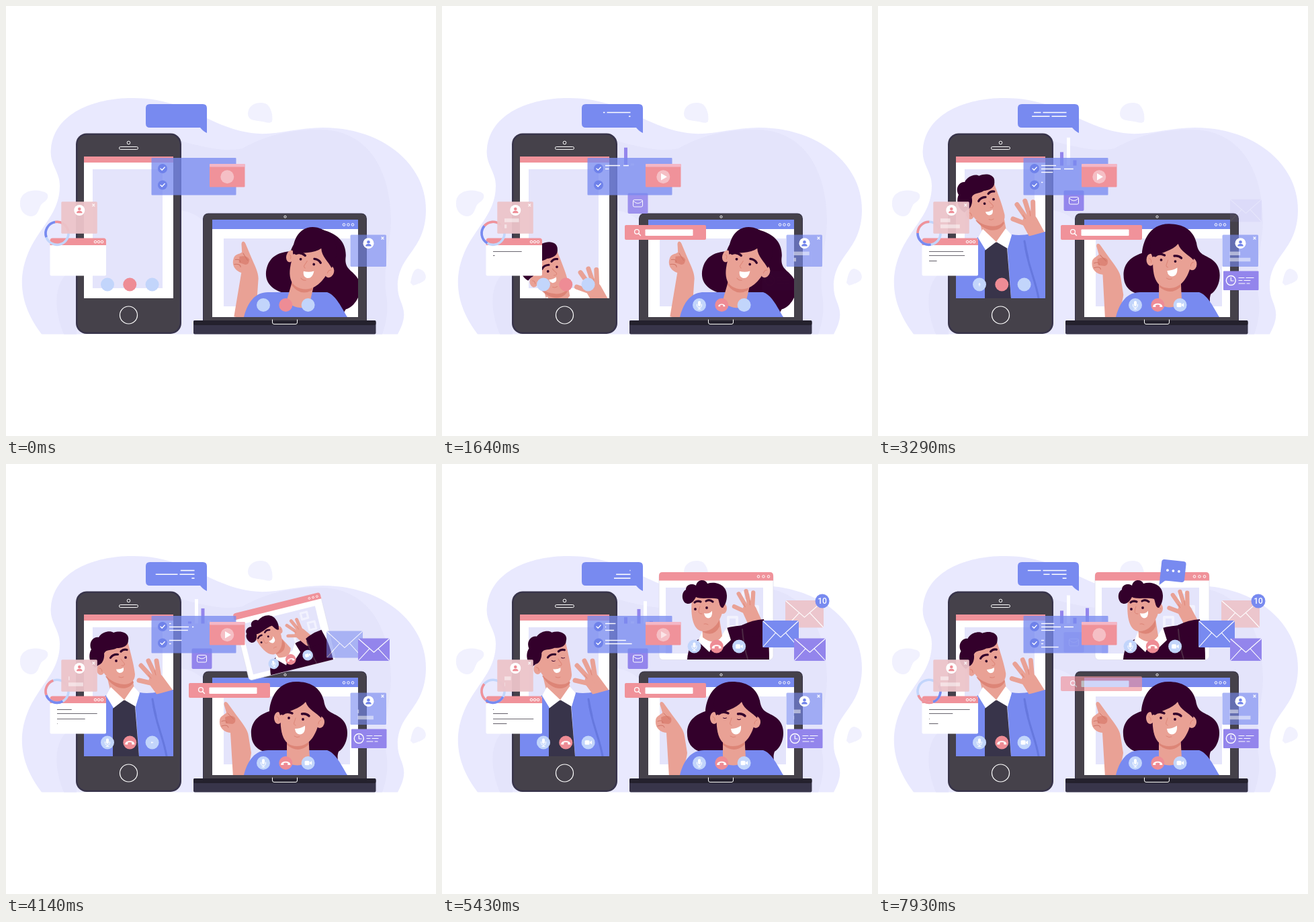
Animation of 640x640 px, one loop 8 s. Source, as an HTML page:

```html
<!DOCTYPE html>
<html lang="en">
<head>
<meta charset="utf-8">
<title>Video call</title>
<style>
html, body { margin: 0; width: 100%; height: 100%; overflow: hidden; background: #fff; }
svg { display: block; width: 100vw; height: 100vh; }
</style>
</head>
<body>
<svg id="stage" viewBox="0 0 640 640"></svg>
<script>
const BLUE = '#788af0', PINK = '#f0929a', SKY = '#c2d5fb', PURPLE = '#9385ec', PALE = '#e4e4fb',
  HAIR = '#33002b', SKIN = '#e9a195', SHADE = '#dd8577', BODY = '#45414a', LOOP = 8000;

// ---------- markup helpers ----------
const rect = (x, y, w, h, fill, r = 0, more = '') =>
  `<rect x="${x}" y="${y}" width="${w}" height="${h}" rx="${r}" fill="${fill}" ${more}/>`;
const disc = (x, y, r, fill, more = '') => `<circle cx="${x}" cy="${y}" r="${r}" fill="${fill}" ${more}/>`;
const ring = (x, y, r, w = 1) => disc(x, y, r, 'none', `stroke="#fff" stroke-width="${w}"`);
const oval = (x, y, rx, ry, fill) => `<ellipse cx="${x}" cy="${y}" rx="${rx}" ry="${ry}" fill="${fill}"/>`;
const shape = (d, fill) => `<path d="${d}" fill="${fill}"/>`;
const line = (d, color = '#fff', w = 1) =>
  `<path d="${d}" fill="none" stroke="${color}" stroke-width="${w}" stroke-linecap="round" stroke-linejoin="round"/>`;
const group = (id, body) => `<g id="${id}">${body}</g>`;
const dots = (x, y, step) => [0, 1, 2].map(i => ring(x + i * step, y, 1.8)).join('');

const icons = [
  rect(-2, -6, 4, 8, '#fff', 2) + line('M-3.5 -1V1Q-3.5 4 0 4T3.5 1V-1M0 4V6M-2 6H2'),
  shape('M-7 3C-8 -4 8 -4 7 3L3 3V0Q0 -1 -3 0V3Z', '#fff'),
  rect(-5, -3.2, 7, 6.4, '#fff', 1.5) + shape('M2.5 -.8L5.5 -3V3L2.5 .8Z', '#fff'),
];
const buttons = (name, x, y) => icons.map((icon, i) =>
  disc(x + i * 33.3, y, 10, i === 1 ? '#ee8c95' : SKY) +
  `<g transform="translate(${x + i * 33.3} ${y})">${group(name + i, icon)}</g>`).join('');

const hand = line('M2 2L-12 -17', SKIN, 23) +
  line('M-12 -12L-38 -18M-15 -18L-35 -40M-12 -22L-24 -47M-8 -22L-12 -47', SKIN, 7) +
  line('M-24 -26L-20 -21M-15 -33L-13 -26', SHADE);

const eyes = (name, points) => group(name, points.map(([x, y]) => disc(x, y, 1.9, HAIR)).join('')) +
  group(name + 'Shut', points.map(([x, y]) => line(`M${x - 2.5} ${y}q2.5 1.5 5 0`, HAIR)).join(''));

const card = (x, y, fill, opacity, accent) => rect(x, y, 53.5, 47.5, fill, 1.5, `opacity="${opacity}"`) +
  disc(x + 27, y + 12.7, 8, '#fff') + disc(x + 27, y + 10.7, 2.3, accent) +
  shape(`M${x + 22.7} ${y + 17}q0 -3.6 4.3 -3.6t4.3 3.6z`, accent) +
  line(`M${x + 46.5} ${y + 3.5}l3 3m0 -3l-3 3`, '#fff', 1.2);

const envelope = (id, x, y, w, h, fill) => group(id, rect(x, y, w, h, fill, 2) +
  line(`M${x + 1} ${y + 1}L${x + w / 2} ${y + h * .62}L${x + w - 1} ${y + 1}
    M${x + 1} ${y + h - 1}L${x + w * .36} ${y + h * .46}M${x + w - 1} ${y + h - 1}L${x + w * .64} ${y + h * .46}`, '#fff', 1.1));

// ---------- lines that grow and shrink ----------
const strokes = { doc: ['#6a6670', 1.1], note: ['#fff', 1.4], bubble: ['#fff', 1.6], bar: ['#fff', 5.5] };
const rows = [
  ...[[365.5, 61, 0], [371.5, 61, 1300], [379.5, 62, 2550], [386.5, 32, 3900]]
    .map(([y, len, delay]) => ({ kind: 'doc', x: 76, y, len, delay, period: 5200, dir: 1 })),
  ...[[158.5, 58, 0, 35], [164.3, 59, 1300, 22], [170, 29, 3500]]
    .map(([y, len, delay, cut]) => ({ kind: 'bubble', x: 280.5, y, len, delay, period: 5200, dir: -1, cut, gap: 3 })),
  ...[[237.5, 42, 0, 22], [242.5, 48, 1150, 29], [247.5, 28, 2000], [262.5, 32, 2900], [267.5, 48, 3800], [272.5, 28, 6100]]
    .map(([y, len, delay, cut]) => ({ kind: 'note', x: 243, y, len, delay, period: 4500, dir: 1, cut, gap: 5 })),
  ...[[93, 319, 26, 0], [93, 328, 29, 1150], [523.5, 368.3, 28, 0], [523.5, 377.5, 31, 1150]]
    .map(([x, y, len, delay]) => ({ kind: 'bar', x, y, len, delay, period: 4500, dir: 1 })),
];
const rowMarkup = kind => rows.map((r, i) => r.kind !== kind ? '' :
  `<path id="row${i}" stroke="${strokes[kind][0]}" stroke-width="${strokes[kind][1]}" ${kind === 'bar' ? 'opacity=".5"' : ''}/>`).join('');

// Chart columns: x, full height, delay, colour
const columns = [[271, 33, 0, PURPLE], [281, 43, 1250, '#fff'], [290.5, 27, 2450, PURPLE], [300, 37, 3600, '#fff'], [309, 30, 4900, PURPLE]];

// ---------- scene ----------
const backdrop =
  shape('M53 488.5C20 445 18 405 32 370C48 330 80 310 80 268C80 245 64 235 67 212C72 160 130 137 188 137C270 137 300 180 365 189C400 194 430 181 472 181C560 181 626 235 625 305C624 365 583 370 583 418C583 445 604 450 583 488.5Z', '#e9e9fe') +
  shape('M250 198C310 215 330 216 352 212C390 190 430 183 475 184C545 190 572 250 573 320C573 350 560 390 566 430C570 455 565 475 560 488.5H330C330 340 300 306 250 303Z', PALE) +
  shape('M86 488.5C66 440 75 400 105 390V488.5Z', PALE) +
  shape('M21 292C22 276 40 272 54 276C66 278 64 288 55 293C48 298 50 312 38 313C27 313 20 303 21 292Z', '#f1f1fe') +
  shape('M360 160C361 146 376 141 388 146C394 150 398 163 396 172C392 176 385 172 375 171C366 170 360 168 360 160Z', '#f1f1fe') +
  shape('M602 412C604 400 607 390 614 391C622 393 627 400 624 407C620 412 612 414 606 416Z', '#f1f1fe');

const bubble = shape('M214 146H293Q299 146 299 152V189Q294 187 289 181H214Q208 181 208 175V152Q208 146 214 146Z', BLUE) + rowMarkup('bubble');

const caller = group('caller',
  shape('M116 435V372C125 358 140 352 149 344L160 362L165 400L159 435Z', BLUE) +
  shape('M192 352L199 340C215 343 230 338 249 336V435H198Z', BLUE) +
  shape('M159 364L176 350L192 360L198 435H159Z', '#38344a') +
  line('M218 350C222 385 234 405 239 435', '#6678de', 3) +
  `<g transform="translate(236 340)">${group('callerHand', hand)}</g>` +
  shape('M214 345Q232 341 249 336V372L222 372Z', BLUE) +
  line('M218 350Q220 362 223 374', '#6678de', 3) +
  shape('M150 315L188 318L192 340L176 352L156 340Z', SKIN) +
  shape('M149 345L156 332L176 351L160 363Z', '#fff') + shape('M190 331L199 341L193 361L176 351Z', '#fff') +
  group('callerHead',
    shape('M148 316C162 338 182 338 190 325L187 318Z', SHADE) +
    shape('M138 280C140 300 143 318 165 326C180 331 192 326 192 313C190 296 185 280 181 264L150 266Z', SKIN) +
    oval(141, 306, 6, 8, SKIN) + line('M139 304q4 0 4 5', SHADE) +
    shape('M133 303C122 295 123 282 127 276C122 266 130 256 138 258C142 250 155 247 160 251C172 247 184 252 182 262C182 272 172 274 165 274C158 278 149 275 146 282C147 290 143 298 138 299Z', HAIR) +
    line('M155.5 288.5Q159 283 166.5 283.5M171 279Q175 275 180 276.5', HAIR, 3.2) +
    eyes('callerEyes', [[164, 293], [178, 288]]) +
    line('M171 290C174 296 179 297 175 300L172 300M168 317q4 2 7 0', SHADE) +
    shape('M164 305.5Q170 306 175 303Q176 311 169 311Q165 310 164 305.5Z', '#fff')));

const phone = rect(104, 189.5, 157, 298.5, '#38344a', 16) + rect(106.5, 192, 152, 293.5, BODY, 14) +
  rect(116, 224, 133, 211, '#fff') + rect(116, 224, 133, 9, PINK) + rect(129, 243, 104, 177, PALE) +
  ring(182.5, 203.5, 2.3) + rect(168.5, 209.5, 28, 4, 'none', 2, 'stroke="#fff"') + ring(182.5, 460, 13, 1.2) +
  `<g clip-path="url(#phoneScreen)">${caller}</g>` + buttons('phoneIcon', 151, 414.5);

const host = group('hostHair',
    shape('M432 324C402 324 393 352 392 368C368 376 362 392 366 410C371 428 390 432 410 430L460 430C475 432 485 448 493 446C495 440 492 436 495 428C508 420 513 395 502 382C490 368 476 374 473 352C468 332 452 324 432 324Z', HAIR)) +
  group('hostArm',
    shape('M338 466L334 400C324 399 317 392 318 382C318 375 325 374 328 370L324.5 358C324 353 328 353 330 356L343 374C351 385 360 395 361 405L365 430C364 440 360 450 356 466Z', SKIN) +
    shape('M326 377Q336 372 341 378Q343 385 337 387L327 386Z', SHADE) +
    line('M321 383Q328 380 329 385M321 390Q330 387 331 392M330 371L339 380', '#cf7567')) +
  shape('M354 463C360 440 371 426 390 426H478C491 430 500 450 508 463Z', BLUE) +
  group('hostHead',
    shape('M418 400H450L452 438C450 451 420 452 418 440Z', SKIN) + shape('M418 408Q432 428 450 408V418Q435 432 418 418Z', SHADE) +
    oval(405, 378, 6, 9, SKIN) + oval(467, 384, 7, 9, SKIN) +
    shape('M410 360C406 395 410 420 433 420C452 420 464 402 467 375L455 345H420Z', SKIN) +
    line('M403 376q4 1 3 6M469 381q-4 1 -4 6', SHADE) +
    shape('M432 326C405 328 401 355 408 374C420 368 438 364 446 354C450 366 462 370 469 378C476 350 462 326 432 326Z', HAIR) +
    line('M412 372Q418 367 426 371M440.5 372Q447 371 451 375', HAIR, 3.4) +
    eyes('hostEyes', [[421, 378], [442, 380]]) +
    line('M431 378C430 384 426 387 431 389M429 405q4 3 8 1', SHADE) +
    shape('M430 394Q438 394 445 389.5Q446 402 437 402.5Q431 402 430 394Z', '#fff'));

const laptop = rect(293, 308.5, 244, 170, '#38344a', 8) + rect(294, 309.5, 242, 165, BODY, 7) +
  rect(307, 318, 217, 145, '#fff') + rect(307, 318, 217, 14, BLUE) + rect(324, 346, 188, 101, PALE) +
  dots(503, 325.5, 6.5) + ring(415.5, 313.7, 1.6) +
  `<g clip-path="url(#laptopScreen)">${host}</g>` + buttons('laptopIcon', 383, 445) +
  rect(279, 468, 271.5, 20.5, '#38354a', 2) + rect(279, 468, 271.5, 7, '#24212d', 2) +
  line('M396.5 467V471Q396.5 473.5 399 473.5H431Q433.5 473.5 433.5 471V467');

const guest = group('guestWindow',
  rect(323, 161.5, 170, 130, '#fff', 6, 'stroke="#dedeee" stroke-width=".8"') +
  shape('M323 173.5V166Q323 161 328 161H488Q493 161 493 166V173.5Z', PINK) + dots(471, 167.5, 7.5) +
  rect(333, 184, 145, 98, PALE) +
  line('M448 191H460V203H448ZM457 212H470V226H457ZM426 228H439V242H426Z', '#f2f2fe', 4) +
  shape('M365 291C366 275 372 265 384 260L428 262L424 244C435 240 450 242 458 236L478 232C486 250 487 270 487 291Z', HAIR) +
  `<g transform="translate(465 235) scale(.9)">${group('guestHand', hand)}</g>` +
  shape('M446 240Q462 232 479 231L484 255L450 258Z', HAIR) + line('M447 246Q449 272 455 290', '#4c2a44', 2) +
  shape('M381 264L387 250Q400 262 416 256L424 243L430 262L412 279L402 272L398 280Z', '#fff') +
  group('guestHead',
    shape('M387 238L413 230L417 256Q406 272 388 258Z', SKIN) + shape('M388 246Q404 246 413 232V242Q405 258 388 250Z', SHADE) +
    oval(418, 215, 6, 8, SKIN) +
    shape('M372 200C369 230 375 250 390 249C405 248 414 235 419 215L418 192H380Z', SKIN) + line('M416 214q4 -2 5 2', SHADE) +
    shape('M361 206C356 200 357 190 363 187C363 179 373 177 378 181C380 171 392 171 395 178C408 174 424 180 424 196C424 205 421 210 418 214C413 214 413 206 411 201C400 198 385 202 378 198C374 206 368 211 361 206Z', HAIR) +
    line('M376 206Q380 203 385 205M393 204Q398 201 403 205', HAIR, 3.2) + disc(377, 216, 1.9, HAIR) + disc(394, 214, 1.9, HAIR) +
    line('M384 212C382 219 380 223 387 223M390 238q3 -1 6 1', SHADE) +
    shape('M390 222Q398 224 402 218.5Q403 229 396 229.5Q391 229 390 222Z', '#fff')) +
  buttons('guestIcon', 375.5, 271.5));

const check = y => disc(233, y, 7, '#6f82ea') + line(`M230 ${y}l2.2 2.2 4 -4.2`, '#fff', 1.3);
const checklist = rect(216.5, 226, 126, 55.5, BLUE, 1, 'opacity=".77"') + check(242) + check(266.5) + rowMarkup('note');

const mailButton = group('mail', rect(276.5, 274.5, 30, 30.5, PURPLE, 2) +
  rect(284.5, 284.5, 14, 10.5, 'none', 2, 'stroke="#fff"') + line('M285 286.5Q291.5 293.5 298 286.5'));

const player = rect(303, 235, 52.5, 34.5, PINK, 1) + rect(303, 235, 52.5, 4.5, '#f4b7c6', 1) +
  disc(329.3, 254.3, 10, '#f5bfc5') + group('play', shape('M326 249L335 254.3L326 259.5Z', '#fff'));

const search = group('search', rect(272, 326, 121, 22, PINK, 2) + rect(302.5, 332.5, 71, 9.5, '#fff', 1) +
  ring(290, 336, 3.4, 1.3) + line('M292.5 338.5L295.5 341.5', '#fff', 1.4));

const reminder = group('reminder', rect(514, 394.5, 52.5, 28.5, PURPLE, 1) + ring(525.3, 408.5, 7, 1.4) +
  line('M525.3 404V409H529M537 404.5H545M548 404.5H559M537 408.5H542M545 408.5H554M537 413H546M549 413H553', '#fff', 1.2));

const report = rect(65.5, 346, 83.5, 55.5, '#fff', 2) +
  shape('M65.5 356V349Q65.5 345.5 69 345.5H145.5Q149 345.5 149 349V356Z', PINK) + dots(133, 351, 5) + rowMarkup('doc');

const onDonut = angle => `${76 + 17 * Math.sin(angle * Math.PI / 180)} ${338.3 - 17 * Math.cos(angle * Math.PI / 180)}`;
const slice = (color, from, to) =>
  `<path d="M${onDonut(from)}A17 17 0 0 1 ${onDonut(to)}" fill="none" stroke="${color}" stroke-width="3.6"/>`;
const donut = group('donut', disc(76, 338.3, 17, 'none', `stroke="${SKY}" stroke-width="3.6"`) +
  slice(BLUE, -50, 50) + slice(PINK, 50, 140));

const badge = group('badge', disc(566, 204, 10.5, BLUE) +
  '<text x="566" y="208.3" text-anchor="middle" font-family="Roboto, sans-serif" font-size="12" font-weight="500" fill="#fff">10</text>');

const reply = group('reply', `<g transform="rotate(6 439 158)">${rect(421, 143.5, 36.5, 31, BLUE, 4)}${
  shape('M421 168V182L431 173Z', BLUE)}${[431, 439.5, 448].map(x => disc(x, 159, 1.9, '#fff')).join('')}</g>`);

const stage = document.getElementById('stage');
stage.innerHTML = `<defs><clipPath id="phoneScreen">${rect(116, 233, 133, 202, '#000')}</clipPath>
  <clipPath id="laptopScreen">${rect(307, 318, 217, 145, '#000')}</clipPath></defs>` +
  backdrop + bubble + phone + laptop + guest +
  columns.map(([x, , , fill], i) => rect(x, 237.5, 5, 0, fill, 0, `id="col${i}"`)).join('') +
  mailButton + checklist + player + search + reminder +
  card(512.5, 340.5, BLUE, .62, '#6f82ea') + report + donut + card(82.3, 291.3, '#ecc4ca', .95, '#ee8c95') +
  rowMarkup('bar') +
  envelope('mailPeach', 511, 203, 57, 40.5, '#ecc6cd') + envelope('mailBlue', 477, 233, 54, 40, BLUE) +
  envelope('mailPurple', 524, 259.5, 47, 33.5, PURPLE) + badge + reply;

// ---------- motion ----------
const el = {};
stage.querySelectorAll('[id]').forEach(node => el[node.id] = node);
const clamp = v => Math.min(1, Math.max(0, v));
const span = (t, a, b) => clamp((t - a) / (b - a));
const easeOut = p => 1 - (1 - p) ** 3;
const easeInOut = p => p < .5 ? 4 * p ** 3 : 1 - 4 * (1 - p) ** 3;
const swell = (t, delay, period) => t < delay ? 0 : (1 - Math.cos((t - delay) / period * 2 * Math.PI)) / 2;
const keys = (t, list) => {
  const i = list.findIndex(k => k[0] > t);
  if (i <= 0) return list[i ? list.length - 1 : 0][1];
  const [[t0, a], [t1, b]] = [list[i - 1], list[i]], p = (t - t0) / (t1 - t0);
  return a + (b - a) * p * p * (3 - 2 * p);
};
const move = (id, transform, opacity = 1) => {
  el[id].setAttribute('transform', transform);
  el[id].setAttribute('opacity', opacity);
};
const turn = (id, angle, x = 0, y = 0, dx = 0, dy = 0) =>
  move(id, `translate(${dx} ${dy}) rotate(${angle} ${x} ${y})`);
const grow = (id, s, x = 0, y = 0, angle = 0) =>
  move(id, `translate(${x} ${y}) rotate(${angle}) scale(${s}) translate(${-x} ${-y})`, s > 0 ? 1 : 0);
const slideIn = (id, p, dy, dx = 0) => move(id, `translate(${dx * (1 - p)} ${dy * (1 - p)})`, p);

function draw(t) {
  rows.forEach(({ x, y, len, delay, period, dir, cut = len, gap = 0 }, i) => {
    const r = len * swell(t, delay, period);
    let d = r > .3 ? `M${x} ${y}h${dir * Math.min(r, cut)}` : '';
    if (r > cut + gap) d += `M${x + dir * (cut + gap)} ${y}H${x + dir * r}`;
    el['row' + i].setAttribute('d', d);
  });
  columns.forEach(([, full, delay], i) => {
    const h = full * swell(t, delay, 4600);
    el['col' + i].setAttribute('y', 237.5 - h);
    el['col' + i].setAttribute('height', h);
  });
  turn('donut', -60 - t * .024, 76, 338.3);

  const lean = 1 - easeInOut(span(t, 1600, 3700));
  turn('hostHair', 16 * lean, 434, 440, 10 * lean, 6 * lean);
  turn('hostHead', 16 * lean, 434, 440);
  turn('hostArm', 13 * lean, 355, 470);

  move('caller', `translate(0 ${202 * (1 - easeInOut(span(t, 880, 2400)))})`);
  turn('callerHead', keys(t, [[1640, -7], [3290, -6], [4140, 0], [5430, 2], [6790, 3], [7930, -3]]), 172, 345);
  turn('callerHand', keys(t, [[1640, 7], [3290, 8], [4140, 0], [5430, 0], [6790, -4], [7930, 4]]));

  const open = easeOut(span(t, 3700, 4800));
  grow('guestWindow', open, 487, 291, -65 * (1 - open));
  const settle = 1 - span(t, 4140, 5100) ** .8;
  turn('guestHead', -20 * settle, 400, 262);
  turn('guestHand', keys(t, [[4140, 0], [5430, 12], [6790, -6], [7930, 8]]), 0, 0, -18 * settle, 9 * settle);

  const shut = t > 5360 && t < 5510;
  ['callerEyes', 'hostEyes'].forEach(name => {
    el[name].setAttribute('opacity', shut ? 0 : 1);
    el[name + 'Shut'].setAttribute('opacity', shut ? 1 : 0);
  });

  icons.forEach((_, i) => {
    grow('laptopIcon' + i, easeOut(span(t, 800 + i * 720, 1150 + i * 720)));
    grow('phoneIcon' + i, easeOut(span(t, 3240 + i * 430, 3600 + i * 430)));
  });

  const leave = span(t, 6600, 8200) ** 2, mailIn = easeOut(span(t, 1000, 2300));
  move('mail', `translate(0 ${30 * (1 - mailIn) - 35 * leave})`, mailIn * (1 - leave * .9));
  const searchIn = easeOut(span(t, 500, 1300)), searchOut = span(t, 7400, 8300);
  move('search', `translate(0 ${20 * (1 - searchIn) - 17 * searchOut})`, searchIn * (1 - searchOut * .6));
  move('play', '', Math.min(span(t, 800, 1300), 1 - span(t, 5200, 5750)));
  slideIn('reminder', easeInOut(span(t, 1450, 2750)), 0, -38);

  slideIn('mailPurple', easeInOut(span(t, 3050, 3900)), 31);
  slideIn('mailBlue', easeInOut(span(t, 3700, 4550)), 35);
  slideIn('mailPeach', easeInOut(span(t, 4350, 5100)), 30);
  grow('badge', easeOut(span(t, 4950, 5350)), 566, 204);
  grow('reply', easeOut(span(t, 7450, 7900)), 419, 180);
}

const start = performance.now();
(function frame() {
  draw((performance.now() - start) % LOOP);
  requestAnimationFrame(frame);
})();
</script>
</body>
</html>
```
